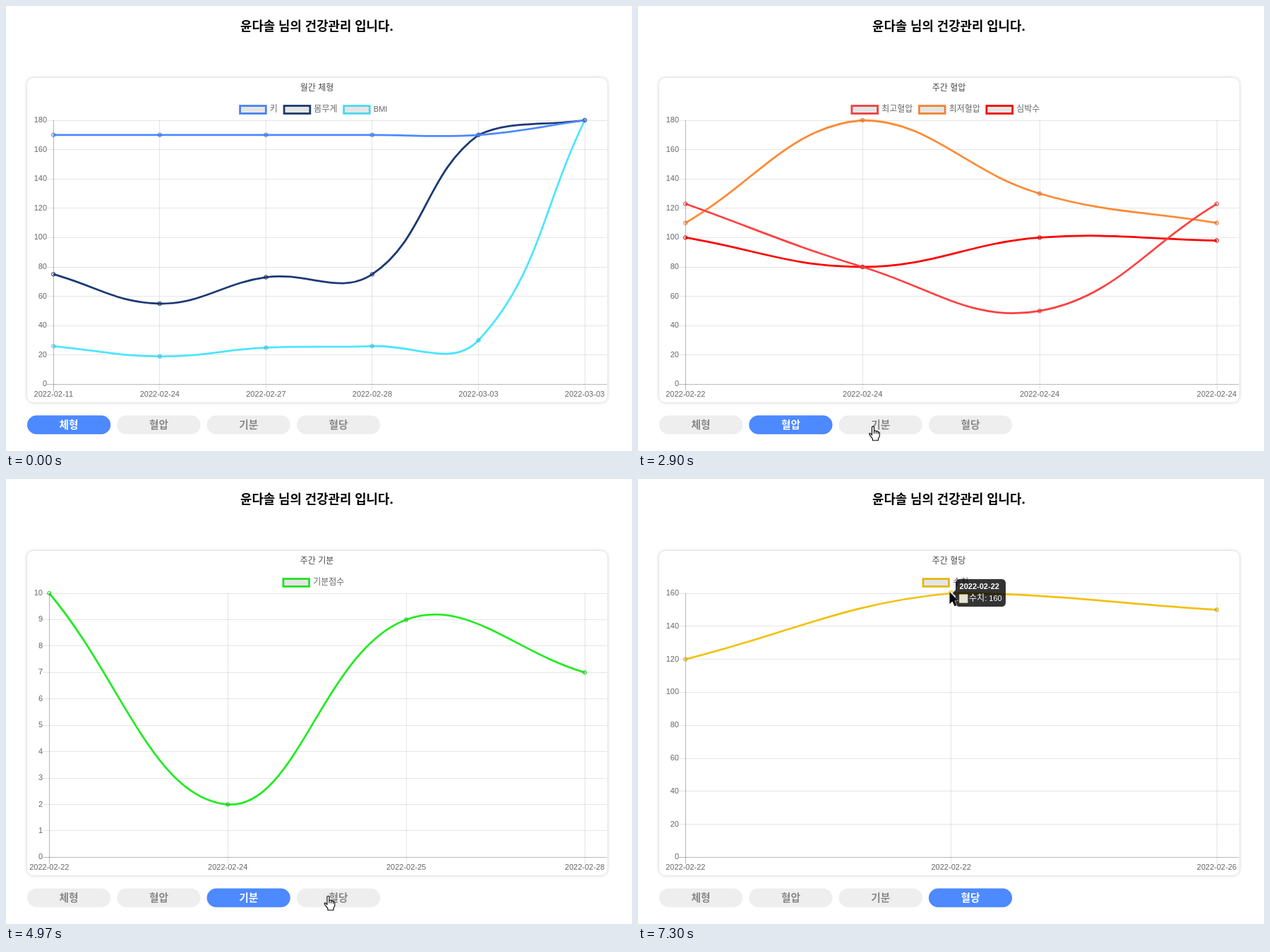
An HTML page that plays this animation: 887x631 px, repeating every 7.37 s.

```html
<!DOCTYPE html>
<html lang="ko">
<head>
<meta charset="utf-8">
<title>건강관리</title>
<style>
  html, body { margin: 0; width: 100%; height: 100%; overflow: hidden; background: #fff; }
  svg { display: block; position: absolute; left: 0; top: 0; }
  text { font-family: "Noto Sans CJK KR", "Noto Sans CJK", "Noto Sans KR", sans-serif; font-size: 12px; fill: #666; }
  .num { font-family: "Liberation Sans", Arial, sans-serif; font-size: 11px; }
  .mid { text-anchor: middle; }
  .end { text-anchor: end; }
  .head { font-size: 17.8px; font-weight: bold; fill: #000; }
  .title { fill: #484848; }
  .btn { font-size: 14.7px; font-weight: bold; }
  .tip text { fill: #fff; }
  .card { position: absolute; left: 30px; top: 102px; width: 822px; height: 460px; border-radius: 9px;
          background: #fff; box-shadow: 0 0 5px rgba(0, 0, 0, .22); }
</style>
</head>
<body>
<div class="card"></div>
<svg id="stage" width="887" height="631" viewBox="0 0 887 631"></svg>
<script>
const LOOP = 7370;
const TOP = 162, BOTTOM = 536.4, RIGHT = 820, EDGE = 851.5, TICK = 9.2;
const stage = document.getElementById('stage');

const CHARTS = [
  { title: '월간 체형', left: 67.3, max: 180, step: 20,
    days: ['02-11', '02-24', '02-27', '02-28', '03-03', '03-03'],
    sets: [
      { name: '키', color: '#4d89ff', data: [170, 170, 170, 170, 170, 180] },
      { name: '몸무게', color: '#1c3a75', data: [75, 55, 73, 75, 170, 180] },
      { name: 'BMI', color: '#4de5ff', data: [26, 19, 25, 26, 30, 180] }
    ] },
  { title: '주간 혈압', left: 67.3, max: 180, step: 20,
    days: ['02-22', '02-24', '02-24', '02-24'],
    sets: [
      { name: '최고혈압', color: '#ff4040', data: [123, 80, 50, 123] },
      { name: '최저혈압', color: '#ff8a35', data: [110, 180, 130, 110] },
      { name: '심박수', color: '#ff0000', data: [100, 80, 100, 98] }
    ] },
  { title: '주간 기분', left: 61.3, max: 10, step: 1,
    days: ['02-22', '02-24', '02-25', '02-28'],
    sets: [{ name: '기분점수', color: '#22ec22', data: [10, 2, 9, 7] }] },
  { title: '주간 혈당', left: 67.3, max: 160, step: 20,
    days: ['02-22', '02-22', '02-26'],
    sets: [{ name: '수치', color: '#f2c10f', data: [120, 160, 150] }] }
];

function el(parent, tag, attrs, text) {
  const node = document.createElementNS('http://www.w3.org/2000/svg', tag);
  for (const key in attrs) node.setAttribute(key, attrs[key]);
  if (text !== undefined) node.textContent = text;
  return parent.appendChild(node);
}
const label = (parent, x, y, cls, text) => el(parent, 'text', { x, y, class: cls }, text);
const clamp = (v, lo, hi) => Math.min(hi, Math.max(lo, v));
const crisp = v => Math.floor(v) + 0.5;

function rule(parent, x1, y1, x2, y2, strong) {
  el(parent, 'line', { x1, y1, x2, y2, stroke: '#000', 'stroke-opacity': strong ? 0.28 : 0.1 });
}

// Smooth line with tension 0.4; handles stay inside the plot area.
function spline(pts, left) {
  const dist = (a, b) => Math.hypot(a[0] - b[0], a[1] - b[1]);
  const handles = pts.map((p, i) => {
    const a = pts[i - 1] || p, b = pts[i + 1] || p;
    const d1 = dist(a, p), d2 = dist(p, b);
    const at = k => [
      clamp(p[0] + k * (b[0] - a[0]), left, EDGE),
      clamp(p[1] + k * (b[1] - a[1]), TOP, BOTTOM)
    ];
    return { before: at(-0.4 * d1 / (d1 + d2)), after: at(0.4 * d2 / (d1 + d2)) };
  });
  return pts.map((p, i) => i
    ? `C${handles[i - 1].after} ${handles[i].before} ${p}`
    : `M${p}`).join('');
}

function legend(g, sets) {
  const BOX = 36.8, GAP = 5.5, PAD = 9.2;
  const wide = s => BOX + GAP + PAD + (s.name === 'BMI' ? 19.6 : s.name.length * 11);
  let x = 440.6 - sets.reduce((sum, s) => sum + wide(s), 0) / 2;
  for (const s of sets) {
    const box = { x, y: 141.5, width: BOX, height: 11 };
    el(g, 'rect', { ...box, fill: 'none', stroke: s.color, 'stroke-width': 2.76 });
    el(g, 'rect', { ...box, fill: '#000', 'fill-opacity': 0.1 });
    label(g, x + BOX + GAP, 150, s.name === 'BMI' ? 'num' : '', s.name);
    x += wide(s);
  }
}

function drawChart(c) {
  const g = el(stage, 'g', {});
  const px = i => c.left + i * (RIGHT - c.left) / (c.days.length - 1);
  const py = v => BOTTOM - v / c.max * (BOTTOM - TOP);
  label(g, 440.6, 120.3, 'mid title', c.title);
  legend(g, c.sets);
  c.days.forEach((day, i) => {
    const x = crisp(px(i));
    rule(g, x, TOP, x, BOTTOM + TICK, i === 0);
    label(g, px(i), 554, 'num mid', '2022-' + day);
  });
  for (let v = 0; v <= c.max; v += c.step) {
    const y = crisp(py(v));
    rule(g, c.left - TICK, y, EDGE, y, v === 0);
    label(g, c.left - 9.3, py(v) + 3, 'num end', v);
  }
  for (const s of [...c.sets].reverse()) {
    const pts = s.data.map((v, i) => [px(i), py(v)]);
    el(g, 'path', { d: spline(pts, c.left), fill: 'none', stroke: s.color, 'stroke-width': 2.76 });
    for (const [cx, cy] of pts) {
      el(g, 'circle', { cx, cy, r: 2.76, fill: '#000', 'fill-opacity': 0.1, stroke: s.color, 'stroke-width': 0.92 });
      el(g, 'circle', { cx, cy, r: 2.76, fill: 'none', stroke: '#000', 'stroke-opacity': 0.1, 'stroke-width': 0.92 });
    }
  }
  return g;
}

function drawButton(name, i) {
  const x = 30 + i * 127.3;
  const rect = el(stage, 'rect', { x, y: 580.6, width: 118.2, height: 26.6, rx: 13.3 });
  const text = label(stage, x + 59.1, 599.4, 'btn mid', name);
  return on => {
    rect.style.fill = on ? '#4d89ff' : '#eee';
    text.style.fill = on ? '#fff' : '#888';
  };
}

function drawTip() {
  const g = el(stage, 'g', { class: 'tip' });
  el(g, 'circle', { cx: 443.7, cy: TOP, r: 3.7, fill: '#e6dfc0', stroke: '#f2c10f', 'stroke-width': 0.92 });
  el(g, 'path', { d: 'M450 157.2L446 161.8L450 166.4Z', 'fill-opacity': 0.8 });
  el(g, 'rect', { x: 450, y: 142, width: 71, height: 39, rx: 5.5, 'fill-opacity': 0.8 });
  label(g, 455.6, 156, 'num', '2022-02-22').style.fontWeight = 'bold';
  el(g, 'rect', { x: 455.7, y: 164, width: 11.2, height: 11.2, fill: '#e6e3da', stroke: '#f4e2a0' });
  label(g, 469, 173, '', '수치');
  label(g, 491.2, 173, 'num', ': 160');
  return g;
}

label(stage, 440.6, 34.8, 'head mid', '윤다솔 님의 건강관리 입니다.');
const charts = CHARTS.map(drawChart);
const buttons = ['체형', '혈압', '기분', '혈당'].map(drawButton);
const tip = drawTip();
const hand = el(stage, 'path', {
  d: 'M-1.5 12.6V1.6a1.5 1.5 0 0 1 3 0V7q0-1 1.4-1t1.4 1.2v.6q0-1 1.4-.9t1.4 1.3v.6q0-.9 1.1-.7t1.1 1.4V14l-1.8 3.5V20H-.6V17.6L-4.6 12.4q-1.4-2 .1-2.6q1-.2 3 2.8M1.5 7v3.4M4.3 7.8v2.8M7.1 8.8v2.2',
  fill: '#fff', stroke: '#000', 'stroke-width': 1.1, 'stroke-linejoin': 'round'
});
const arrow = el(stage, 'path', {
  d: 'M0 0V17L4 13.4L7 20L10 18.8L7.2 12.4H12.2Z',
  fill: '#000', stroke: '#fff', 'stroke-width': 1, 'paint-order': 'stroke'
});

// Button reacts one step before the chart is swapped.
const SWITCHES = [1370, 3300, 5300];
const pageAt = t => SWITCHES.filter(s => t >= s).length;

const easeOut = (u, k) => 1 - Math.pow(1 - u, k);
const easeInOut = u => u * u * (3 - 2 * u);

const MOVES = [
  { from: 700, to: 1030, at: u => {
    const p = easeOut(u, 1.6);
    return [213 + 27 * p, 628 - 32 * p];
  } },
  { from: 2300, to: 2900, at: u => {
    const p = easeInOut(u);
    return [240 + 93 * p, 596 + 2 * Math.sin(Math.PI * p)];
  } },
  { from: 4300, to: 4970, at: u => {
    const p = easeInOut(u);
    return [333 + 123.5 * p, 596 - 4.8 * p + 4 * Math.sin(Math.PI * p)];
  } },
  { from: 6170, to: 6930, at: u => {
    const p = easeOut(u, 1.73);
    return [456.5 + 210 * p - 225 * p * p, 591.2 - 431 * p];
  } }
];

function pointer(t) {
  const m = MOVES.filter(m => t >= m.from).pop();
  return m.at(clamp((t - m.from) / (m.to - m.from), 0, 1));
}

function render(t) {
  const page = pageAt(t - 30), active = pageAt(t);
  charts.forEach((g, i) => { g.style.display = i === page ? '' : 'none'; });
  buttons.forEach((set, i) => set(i === active));
  tip.style.opacity = easeOut(clamp((t - 6900) / 400, 0, 1), 4);

  const visible = t >= 730;
  const [x, y] = visible ? pointer(t) : [0, 0];
  const overButton = y > 580 && y < 607.5;
  hand.style.display = visible && overButton ? '' : 'none';
  arrow.style.display = visible && !overButton ? '' : 'none';
  (overButton ? hand : arrow).setAttribute('transform', `translate(${x.toFixed(1)} ${y.toFixed(1)})`);
}

const start = performance.now();
function tick() {
  render((performance.now() - start) % LOOP);
  requestAnimationFrame(tick);
}
tick();
</script>
</body>
</html>
```
